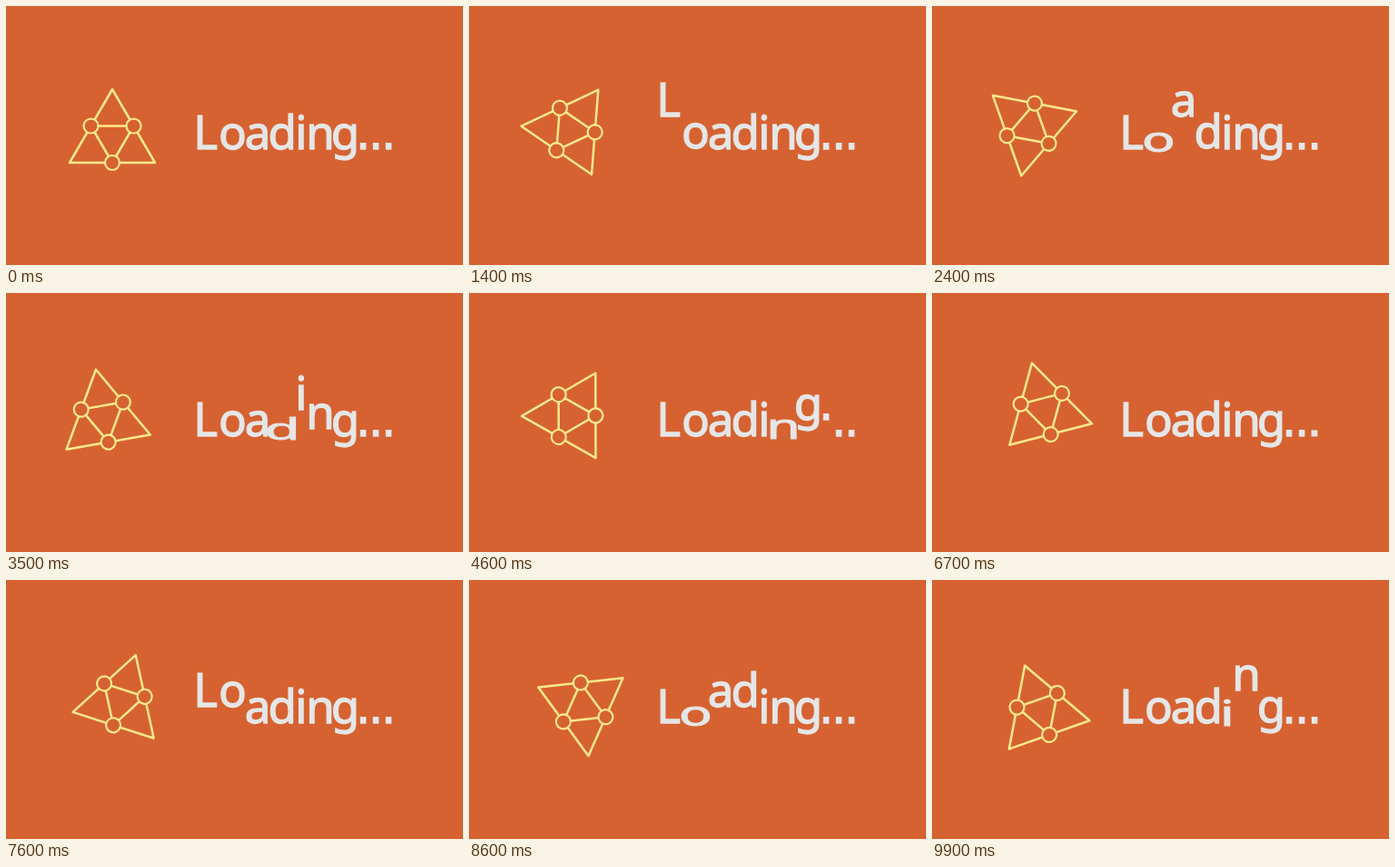
An HTML page that plays this animation: 503x286 px, repeating every 10 s.

```html
<!DOCTYPE html>
<html lang="en">
<head>
<meta charset="utf-8">
<title>Loading</title>
<style>
  html, body { margin: 0; width: 100%; height: 100%; overflow: hidden; background: #d66231; }
  svg { display: block; width: 503px; height: 286px; }
  text {
    font: 51px "Noto Sans", "Open Sans", sans-serif;
    fill: #e6e6e6; stroke: #e6e6e6; stroke-width: 1.3; text-anchor: middle;
  }
  .dot { font-family: "DejaVu Sans", sans-serif; }
  #emblem { fill: none; stroke: #ffe98c; stroke-width: 2.5; stroke-linejoin: round; }
  #emblem circle { fill: #d66231; stroke-width: 2.2; }
</style>
</head>
<body>
<svg viewBox="0 0 503 286">
  <rect width="503" height="286" fill="#d66231"/>
  <g id="emblem">
    <path d="M0-44.5L47 36.5H-47ZM-23.5-4H23.5L0 36.5Z"/>
    <circle cx="-23.5" cy="-4" r="8"/>
    <circle cx="23.5" cy="-4" r="8"/>
    <circle cy="36.5" r="8"/>
  </g>
  <g id="word"></g>
</svg>
<script>
const LOOP = 10000, STEP = 100, START = 500;
const BASELINE = 157.5, JUMP = 36;
const FIRST_PEAK = 1350, STAGGER = 500, CYCLE = 6000;
const centers = [219.5, 249.3, 277, 304.2, 324.8, 346, 373.4, 393, 407, 421];

const emblem = document.getElementById("emblem");
const word = document.getElementById("word");
const letters = [..."Loading..."].map(char => {
  const node = document.createElementNS("http://www.w3.org/2000/svg", "text");
  node.textContent = char;
  if (char === ".") node.classList.add("dot");
  return word.appendChild(node);
});

// Half a sine wave between two times, zero outside them.
const pulse = (t, from, to) =>
  t > from && t < to ? Math.sin(Math.PI * (t - from) / (to - from)) : 0;

function poseLetter(node, i, t) {
  const peak = FIRST_PEAK + i * STAGGER;
  const fromPeak = t < peak + CYCLE / 2 ? t - peak : t - peak - CYCLE;
  const lift = JUMP * pulse(fromPeak, -500, 500) ** 2;
  const squash = pulse(fromPeak, 425, 875);
  const y = BASELINE - lift + 4 * squash;
  node.setAttribute("transform",
    `translate(${centers[i]} ${y}) scale(${1 + 0.25 * squash} ${1 - 0.35 * squash})`);
}

function render(time) {
  const t = Math.floor(time % LOOP / STEP) * STEP;
  const angle = t < START ? 0 : (t - 440) * 360 / LOOP;
  // One slow sway up and down, then a steady spin.
  const sway = t > START && t < 5500 ? -8 * Math.sin((t - START) / 5000 * 2 * Math.PI) : 0;
  emblem.setAttribute("transform", `translate(117 ${136.5 + sway}) rotate(${angle})`);
  letters.forEach((node, i) => poseLetter(node, i, t));
}

const origin = performance.now();
function tick() {
  render(performance.now() - origin);
  requestAnimationFrame(tick);
}
tick();
</script>
</body>
</html>
```
